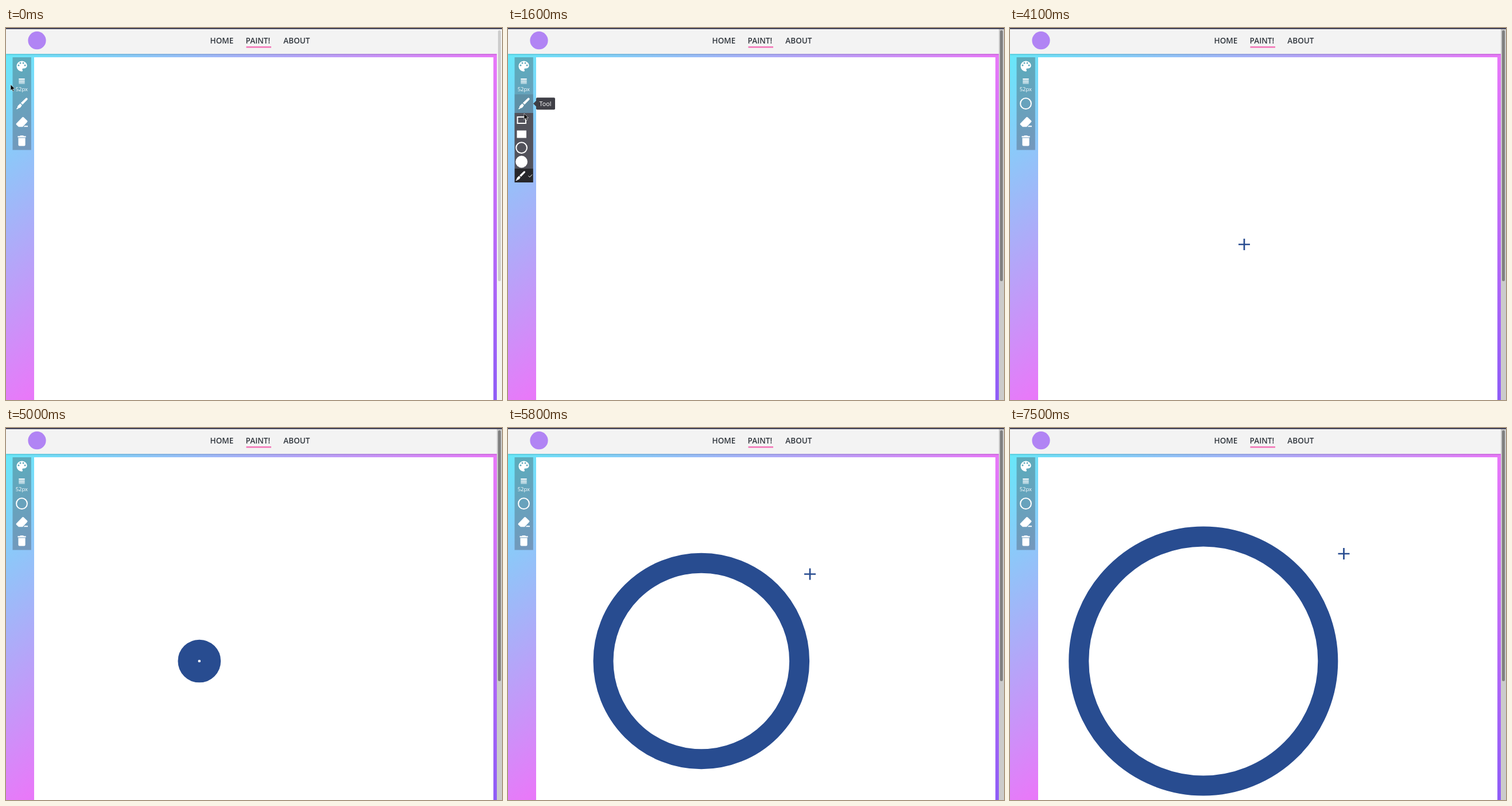
Write an HTML page that moves like this. It is 864 px wide and 648 px high and loops after 8 s.

```html
<!DOCTYPE html>
<html lang="en">
<head>
<meta charset="utf-8">
<title>Paint app</title>
<style>
  html, body { margin: 0; width: 100%; height: 100%; overflow: hidden; }
  #stage { position: relative; width: 864px; height: 648px; overflow: hidden; background: #f3f3f3; }
  #stage > div { position: absolute; }
  #page { left: 0; top: 45px; width: 855px; height: 625px;
    background: linear-gradient(to bottom right, #67e8f9, #e879f9, #8b5cf6); }
  #paper { left: 49px; top: 50.5px; width: 799.5px; height: 600px; background: #fff; }
  #header { left: 0; top: 0; width: 855px; height: 45px; background: #f3f3f3; box-shadow: 0 1px 3px #0003; }
  #topline { left: 0; top: 0; width: 864px; height: 2px; background: #3f4056; }
  #track { left: 855px; top: 2px; width: 9px; height: 646px; background: #f3f3f3; }
  #thumb { left: 857px; top: 4px; width: 4.5px; height: 437px; border-radius: 3px; background: #cdcdcd; }
  .focused #track { background: #cbcbcb; }
  .focused #thumb { background: #808080; }
  svg { position: absolute; left: 0; top: 0; }
  text { font-family: "Open Sans", "Noto Sans", sans-serif; fill: #fff; }
  .nav text { font-size: 13.5px; font-weight: 600; fill: #30363d; }
  .icon { fill: #fff; }
  .line { fill: none; stroke: #fff; stroke-width: 2; }
</style>
</head>
<body>
<div id="stage">
  <div id="page"></div>
  <div id="paper"></div>
  <div id="header"></div>
  <div id="topline"></div>
  <div id="track"></div>
  <div id="thumb"></div>
  <svg width="864" height="648" viewBox="0 0 864 648">
    <defs>
      <g id="brush" class="icon">
        <path d="M8 9.2 16.6.9Q18-.3 19.3.9T19.3 3.7L11 12.2Z"/>
        <path d="M7 10.2 10 13.2 8.2 16.2Q6.6 18.4 4 18.4L2.4 20H-.2L2 17.4Q1.8 15 3.6 13.4Z"/>
      </g>
    </defs>

    <circle cx="54" cy="21.7" r="15.6" fill="#b184f4"/>
    <g class="nav">
      <text x="355.5" y="27">HOME</text>
      <text x="417.6" y="27">PAINT!</text>
      <text x="483.3" y="27">ABOUT</text>
      <rect x="418.5" y="32" width="43.5" height="2.5" fill="#f472b6"/>
    </g>

    <rect x="11.5" y="51" width="32.3" height="161.5" fill="#3f3f46" opacity=".34"/>
    <rect id="hover" x="11.5" width="32.3" fill="#3f3f46" opacity=".2"/>

    <path class="icon" fill-rule="evenodd" transform="translate(15.4 54.4) scale(1.0125)"
      d="M12 3a9 9 0 0 0 0 18 1.5 1.5 0 0 0 1.1-2.5 1.5 1.5 0 0 1 1.1-2.5H16a5 5 0 0 0 5-5C21 6.6 17 3 12 3Z
         M5 10.500a1.5 1.500 0 1 0 3 0a1.500 1.500 0 1 0-3 0 M8 6.500a1.500 1.500 0 1 0 3 0a1.500 1.500 0 1 0-3 0
         M13 6.500a1.500 1.500 0 1 0 3 0a1.500 1.500 0 1 0-3 0 M16 10.500a1.500 1.500 0 1 0 3 0a1.500 1.500 0 1 0-3 0"/>
    <path class="icon" transform="translate(20.5 85.6) scale(.58)"
      d="M3 4h18v4H3ZM3 10h18v3H3ZM3 15h18v2H3ZM3 19h18v1H3Z"/>
    <text x="27.4" y="110" font-size="9.45" text-anchor="middle">52px</text>
    <use id="brushTool" href="#brush" x="17.8" y="121.3"/>
    <circle id="circleTool" class="line" cx="27.5" cy="131.7" r="9.4"/>
    <path class="icon" d="M18 166.300 28.400 155.600Q29.600 154.500 30.800 155.600L37 161.500Q38 162.600 37 163.700L29 172.200H22L18 168.500Q17 167.400 18 166.300ZM32.500 170.300H38V172.200H30.600Z"/>
    <path class="icon" transform="translate(15.4 184.3) scale(1.0125)"
      d="M6 19q0 2 2 2h8q2 0 2-2V7H6ZM19 4h-3.500l-1-1h-5l-1 1H5v2h14Z"/>

    <g id="menu">
      <rect x="11.500" y="148" width="32.300" height="97" fill="#52525b"/>
      <rect x="11.500" y="245" width="32.300" height="24" fill="#27272a"/>
      <rect class="line" x="16.500" y="155" width="14.500" height="11"/>
      <rect class="icon" x="15.500" y="178.500" width="16.500" height="13"/>
      <circle class="line" cx="23.600" cy="208.600" r="9.400"/>
      <circle class="icon" cx="23.600" cy="233" r="10.400"/>
      <use href="#brush" transform="translate(13.400 249) scale(.84)"/>
      <path class="line" style="stroke-width:1" d="M35.500 257.500 37.800 259.800 42 255.300"/>
    </g>

    <g id="tip">
      <path d="M44 0 49-5V5Z" fill="#3f3f46"/>
      <rect id="tipBox" x="49" y="-10.500" height="21" rx="2" fill="#3f3f46"/>
      <text id="tipText" x="54.600" y="4" font-size="10.800"></text>
    </g>

    <circle id="ring" cx="336.800" cy="406" fill="none" stroke="#284c90" stroke-width="35"/>
    <path id="cross" d="M-10 0H10M0-10V10" stroke="#284c90" stroke-width="2.700"/>
    <path id="arrow" d="M0 0V10.400L2.400 8.200 4 12 5.800 11.200 4.200 7.500H7.500Z" fill="#000" stroke="#fff" stroke-width=".6"/>
  </svg>
</div>
<script>
const LOOP = 8000, STEP = 100;
const FOCUS = 1300, MENU_OPEN = 1300, PICK = 2400, DRAG = 4800;
const CENTER = [336.8, 406];
const EDGES = [51, 83, 115.5, 148, 180, 212.5];
const TIPS = [["Colour", 45], ["Stroke Width", 76], ["Tool", 33], ["Eraser", 43], ["Clear", 39]];

// Pointer path: time, x, y
const PATH = [
  [0, 8, 98.5], [300, 24, 100], [600, 28, 128], [900, 29, 163], [1100, 27, 141],
  [1300, 27, 141], [1600, 28, 149], [2100, 26, 206], [2200, 34, 209], [2600, 34, 209],
  [2800, 39, 172], [2900, 62, 182], [3200, 285, 335], [3400, 403, 407],
  [3500, 386, 385], [4100, 408, 377], [4400, 442, 344], [4800, 336.8, 406],
  [5000, 360, 390], [5300, 439, 336], [5400, 450.5, 327.5], [5800, 526, 254.5],
  [6000, 562, 222], [6200, 587, 201], [7100, 587, 201], [7500, 581.5, 219], [LOOP, 581.5, 219]
];

const el = id => document.getElementById(id);
const show = (id, on) => el(id).setAttribute("visibility", on ? "visible" : "hidden");
const place = (id, x, y) => el(id).setAttribute("transform", `translate(${x} ${y})`);

function pointerAt(t) {
  const i = PATH.findIndex(key => key[0] > t);
  const [t0, x0, y0] = PATH[i - 1], [t1, x1, y1] = PATH[i];
  const k = (t - t0) / (t1 - t0);
  return [x0 + (x1 - x0) * k, y0 + (y1 - y0) * k];
}

function buttonAt(x, y, menuOpen) {
  if (menuOpen) return 2;
  if (x < 11.5 || x > 44) return -1;
  return EDGES.findIndex((top, i) => y >= top && y < EDGES[i + 1]);
}

function showHover(button) {
  const on = button >= 0;
  show("hover", on);
  show("tip", on);
  if (!on) return;
  const top = EDGES[button], height = EDGES[button + 1] - top;
  const [label, width] = TIPS[button];
  el("hover").setAttribute("y", top);
  el("hover").setAttribute("height", height);
  el("tipText").textContent = label;
  el("tipBox").setAttribute("width", width);
  place("tip", 0, top + height / 2);
}

function render(time) {
  const t = Math.floor(time % LOOP / STEP) * STEP;
  const [x, y] = pointerAt(t);
  const menuOpen = t >= MENU_OPEN && t < PICK;
  const onPaper = x > 49;

  el("stage").classList.toggle("focused", t >= FOCUS);
  show("menu", menuOpen);
  show("brushTool", t < PICK);
  show("circleTool", t >= PICK);
  showHover(buttonAt(x, y, menuOpen));

  show("arrow", !onPaper);
  show("cross", onPaper);
  place(onPaper ? "cross" : "arrow", x, y);

  show("ring", t > DRAG);
  el("ring").setAttribute("r", 0.7047 * Math.hypot(x - CENTER[0], y - CENTER[1]));
}

const start = performance.now();
function tick() {
  render(performance.now() - start);
  requestAnimationFrame(tick);
}
tick();
</script>
</body>
</html>
```
